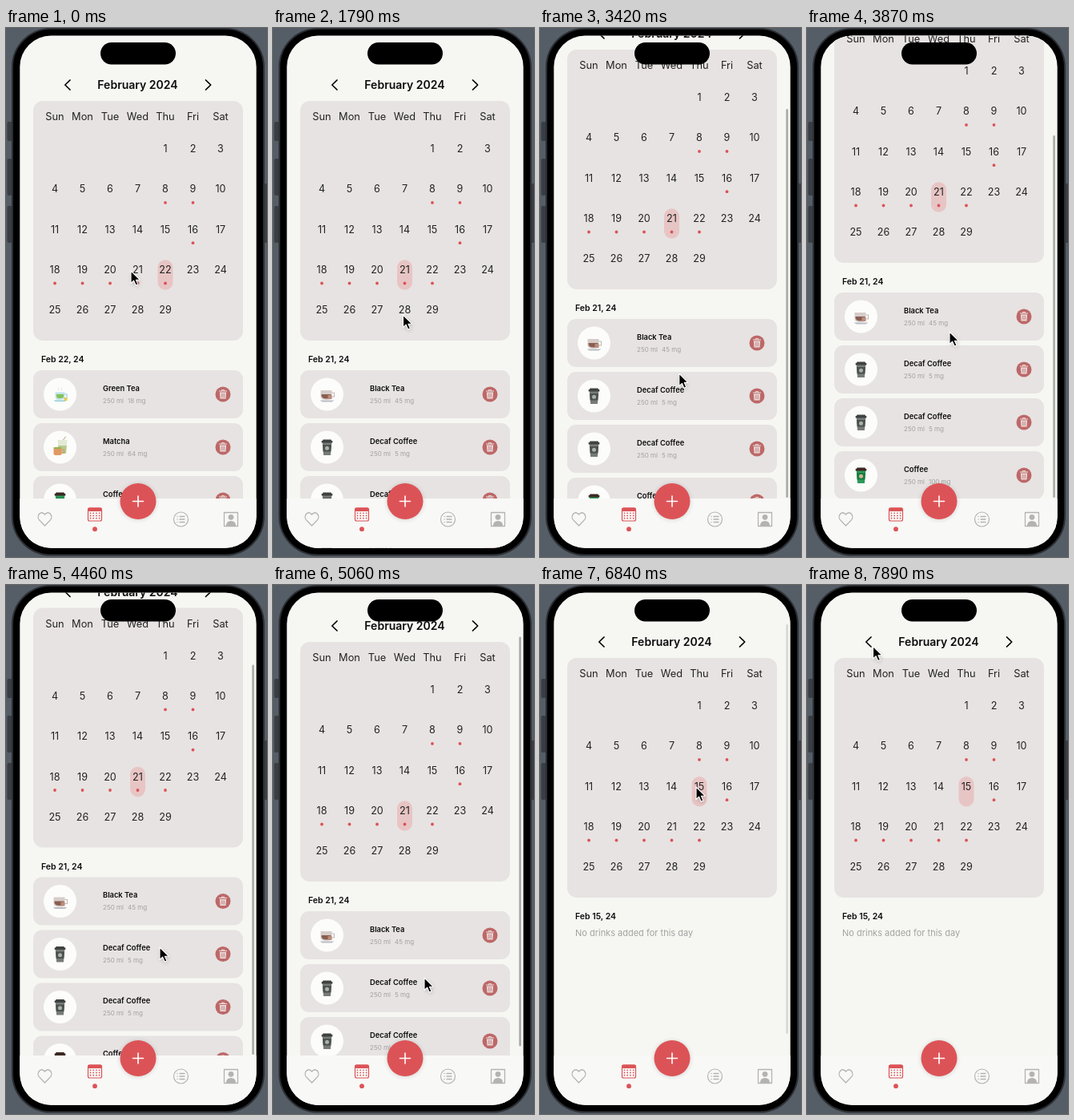
An HTML page for the animation above (8000 ms loop, 326 px wide and 660 px high).

```html
<!DOCTYPE html>
<html lang="en">
<head>
<meta charset="utf-8">
<title>Drink calendar</title>
<style>
  html, body { margin: 0; width: 100%; height: 100%; overflow: hidden; background: #555d67; }
  svg { display: block; width: 326px; height: 660px; font-family: Montserrat, Inter, sans-serif; }
  .mid { text-anchor: middle; }
  .bold { font-weight: 600; fill: #0c0c0c; }
  .day { fill: #222; }
  .note { fill: #a3a1a0; }
  .line { fill: none; stroke-linecap: round; stroke-linejoin: round; }
</style>
</head>
<body>
<svg viewBox="0 0 326 660">
  <defs>
    <clipPath id="screen"><rect x="17.3" y="9.5" width="295.4" height="639.3" rx="39"/></clipPath>
    <filter id="blur" x="-50%" y="-50%" width="200%" height="200%"><feGaussianBlur stdDeviation="2.5"/></filter>
  </defs>
  <g fill="#3a3e44">
    <rect x="1.5" y="117" width="6" height="24" rx="2"/>
    <rect x="1.5" y="163" width="6" height="46" rx="2"/>
    <rect x="1.5" y="222" width="6" height="46" rx="2"/>
    <rect x="322" y="194" width="6" height="74" rx="2"/>
  </g>
  <rect x="8" y="0.8" width="314" height="656.8" rx="48" fill="#000" stroke="#2c2f33" stroke-width="2"/>
  <g clip-path="url(#screen)">
    <rect x="17" y="9" width="296" height="641" fill="#f6f7f3"/>
    <g id="page"></g>
    <rect id="bar" x="307.3" width="2.6" rx="1.3" fill="#aaaba7"/>
    <rect x="17" y="587" width="296" height="63" fill="#f8f8f6"/>
    <g id="nav"></g>
  </g>
  <rect x="118" y="18" width="94" height="27.5" rx="13.7"/>
  <g id="cursor">
    <path d="M1 2V17.5L4.6 14.2L7.2 20L9.9 18.9L7.4 13.2H12.2Z" opacity=".22" filter="url(#blur)"/>
    <path d="M0 0V15.5L3.6 12.2L6.2 18L8.9 16.9L6.4 11.2H11.2Z" stroke="#fff" stroke-width="1.1" stroke-linejoin="round"/>
  </g>
</svg>
<script>
const LOOP = 8000, TICK = 148.8;
const RED = '#dc5357', GREY = '#b4b3b2', PANEL = '#e7e3e2', ROSE = '#bd6868';
const byId = id => document.getElementById(id);

const text = (x, y, size, cls, str) =>
  `<text x="${x}" y="${y + size * 0.36}" font-size="${size}" class="${cls}">${str}</text>`;
const rect = (x, y, w, h, r, fill) =>
  `<rect x="${x}" y="${y}" width="${w}" height="${h}" rx="${r}" fill="${fill}"/>`;
const disc = (x, y, r, fill) => `<circle cx="${x}" cy="${y}" r="${r}" fill="${fill}"/>`;
const shape = (d, fill) => `<path d="${d}" fill="${fill}"/>`;
const line = (d, color, width) => `<path class="line" d="${d}" stroke="${color}" stroke-width="${width}"/>`;
const at = (x, y, body) => `<g transform="translate(${x} ${y})">${body}</g>`;

// Drink icons, centred on 0,0
const paperCup = (body, sleeve, lid, badge) =>
  shape('M-5.8 -6H5.8L4.4 10H-4.4Z', body) +
  shape('M-5.5 -3H5.5L4.8 5.5H-4.8Z', sleeve) +
  shape('M-5 -9.5H5L5.6 -8H6.8V-5.5H-6.8V-8H-5.6Z', lid) +
  disc(0, 1.2, 2.5, badge);

const icons = {
  greenTea:
    line('M6 0H8.5V5H5', '#a9d8e2', 1.3) +
    shape('M-6 -2.5H6V4Q6 7-2 7Q-6 7-6 3Z', '#bfe3ea') +
    shape('M-4.5 0H4.5V3Q4 5-1 5Q-4.5 5-4.5 2Z', '#86c25a') +
    shape('M-8 7.5H8L6 9H-6Z', '#8fcbd8') +
    shape('M5 4H9V8H5Z', '#e4cf52') +
    line('M-2 -5Q-1 -6-2 -8M2 -5Q3 -6 2 -8', '#d8ebec', 1),
  matcha:
    line('M4 -9L7 -13', '#b99d78', 1) +
    shape('M-3 -9H9L7.5 8H-1.5Z', '#e2ead5') +
    shape('M-2.5 -2H8.3L7.5 8H-1.5Z', '#b5cb90') +
    shape('M-8 0H2V8Q2 10-1 10H-5Q-8 10-8 8Z', '#e09a63') +
    line('M2.5 3H5V7H2.5', '#d99463', 1.2) +
    shape('M-7 0H1V2H-7Z', '#8db657'),
  blackTea:
    line('M6 -2H9V3H6', '#c4bdbb', 1.2) +
    shape('M-8 -5H6V3Q6 7-1 7Q-8 7-8 3Z', '#d5ccca') +
    shape('M-7 0H5V2Q4 5.5-1 5.5Q-6 5.5-7 2Z', '#895d50') +
    shape('M-9 7.5H9L6 9.5H-6Z', '#b9bcc4') +
    shape('M1 1H6V6H1Z', '#b98d7b'),
  decaf: paperCup('#777b78', '#4b514d', '#3e4240', '#a9b3a9'),
  coffee: paperCup('#2d9a58', '#167c43', '#3b2923', '#d3b58c')
};

const drinks = {
  greenTea: ['Green Tea', 18], matcha: ['Matcha', 64], blackTea: ['Black Tea', 45],
  decaf: ['Decaf Coffee', 5], coffee: ['Coffee', 100]
};

const trash = disc(0, 0, 9.5, ROSE) +
  shape('M-4.1 -2.6H4.1L3.5 5.6H-3.5Z', '#eadfde') +
  line('M-4.6 -4H4.6M-1.6 -4.2V-5.4H1.6V-4.2', '#eadfde', 1) +
  line('M-1.8 -0.8V3.8M0 -0.8V3.8M1.8 -0.8V3.8', ROSE, 0.7);

const card = (key, i) => {
  const [name, mg] = drinks[key];
  return at(34, 427 + 66 * i,
    rect(0, 0, 262, 60, 11, PANEL) + disc(33.5, 30, 20.5, '#fcfcfa') + at(33.5, 30, icons[key]) +
    text(87, 22.5, 9.3, 'bold', name) +
    text(87, 38, 8, 'note', '250 ml') + text(118, 38, 8, 'note', mg + ' mg') +
    at(237, 30, trash));
};

const dayList = (day, keys) => `<g id="list${day}">` +
  text(44, 413.5, 10.5, 'bold', `Feb ${day}, 24`) +
  (keys.length ? keys.map(card).join('') : text(44, 434.5, 11, 'note', 'No drinks added for this day')) + '</g>';

const colX = c => 61 + 34.5 * c;
const rowY = r => 150.6 + 50.3 * r;
const dayPos = d => [colX((d + 3) % 7), rowY(Math.floor((d + 3) / 7))];

const calendar = () => {
  const marked = [8, 9, 16, 18, 19, 20, 21, 22];
  let out = text(164.5, 71, 14, 'bold mid', 'February 2024') +
    line('M80 65L73.8 71L80 77M249.5 65L255.7 71L249.5 77', '#000', 1.7) +
    rect(34, 91, 262, 299, 12, PANEL) +
    '<rect id="pick" width="19" height="37.5" rx="9.5" fill="#e7c5c4"/>';
  'Sun Mon Tue Wed Thu Fri Sat'.split(' ').forEach((name, c) => out += text(colX(c), 110.5, 12.8, 'mid day', name));
  for (let d = 1; d <= 29; d++) {
    const [x, y] = dayPos(d);
    out += text(x, y, 12.6, 'mid day', d);
    if (marked.includes(d)) out += disc(x, y + 17, 1.9, RED);
  }
  return out;
};

const navIcons = () => {
  let cells = '';
  for (let i = 0; i < 12; i++) cells += rect(104.7 + 3.7 * (i % 4), 604.4 + 3.2 * Math.floor(i / 4), 1.6, 1.6, 0.5, RED);
  return line('M48.5 621L41.4 613.6C37.5 609 43.5 600.8 48.5 607C53.5 600.8 59.5 609 55.6 613.6Z', GREY, 1.3) +
    rect(102, 598.5, 18, 4.6, 2, RED) +
    line('M104.5 599H117.5Q119.5 599 119.5 601V613Q119.5 615 117.5 615H104.5Q102.5 615 102.5 613V601Q102.5 599 104.5 599Z', RED, 1.2) +
    cells + disc(111, 625.2, 2.9, RED) +
    `<circle cx="218.5" cy="613" r="9" fill="none" stroke="${GREY}" stroke-width="1.2"/>` +
    line('M214 609.5h.1M214 613h.1M214 616.5h.1M217 609.5H223M217 613H223M217 616.5H223', GREY, 1.3) +
    line('M272.5 604.5H289.5V621.5H272.5Z', GREY, 1.3) +
    disc(281, 610.3, 3.4, GREY) + shape('M275 621Q275 615 281 615Q287 615 287 621Z', GREY) +
    `<circle cx="165" cy="591" r="23.5" opacity=".11" filter="url(#blur)"/>` +
    disc(165, 590.5, 22.5, RED) + line('M158.5 590.5H171.5M165 584V597', '#fff', 1.6);
};

byId('page').innerHTML = calendar() +
  dayList(22, ['greenTea', 'matcha', 'coffee']) +
  dayList(21, ['blackTea', 'decaf', 'decaf', 'coffee']) +
  dayList(15, []);
byId('nav').innerHTML = navIcons();

// Keys are [tick, value...]
const pointer = [
  [0, 156, 303], [11, 156, 303], [12, 162.5, 358], [13, 169, 470], [14, 169, 517], [15, 169, 517],
  [18, 170, 477], [20, 171, 466], [21, 171, 466], [26, 178, 379], [27, 178, 379],
  [30, 192, 452], [34, 189, 490], [38, 186.5, 507], [40, 186.5, 507], [42, 209, 395],
  [44, 195, 252], [49, 195, 252], [53, 82.5, 76.5]
];
const scroll = [
  [0, 0], [15, 0], [18, 31.5], [20, 42], [21, 42], [26, 97], [27, 97],
  [30, 62.5], [34, 20], [38, 2.8], [45, 2.8], [46, 0]
];

function sample(keys, tick) {
  const i = keys.findIndex(k => k[0] > tick);
  if (i < 0) return keys[keys.length - 1].slice(1);
  const a = keys[i - 1], b = keys[i], f = (tick - a[0]) / (b[0] - a[0]);
  return a.slice(1).map((v, j) => v + (b[j + 1] - v) * f);
}

function render(t) {
  const tick = Math.floor((t + 14) / TICK);
  const [x, y] = sample(pointer, tick);
  const [offset] = sample(scroll, tick);
  const day = tick < 5 ? 22 : tick < 46 ? 21 : 15;

  byId('cursor').setAttribute('transform', `translate(${x} ${y})`);
  byId('page').setAttribute('transform', `translate(0 ${-offset})`);
  for (const d of [22, 21, 15]) byId('list' + d).setAttribute('display', d === day ? 'inline' : 'none');
  const [px, py] = dayPos(day);
  byId('pick').setAttribute('x', px - 9.5);
  byId('pick').setAttribute('y', py - 12.3);

  // The bar shortens while the page is pulled past its end
  const top = Math.max(49 + 0.78 * offset, 37 + offset);
  const bar = byId('bar');
  bar.setAttribute('y', top);
  bar.setAttribute('height', Math.min(511, 586 - top));
  bar.setAttribute('opacity', tick < 16 || tick > 46 ? 0 : tick === 46 ? 0.4 : 1);
}

function loop() {
  render(performance.now() % LOOP);
  requestAnimationFrame(loop);
}
loop();
</script>
</body>
</html>
```
